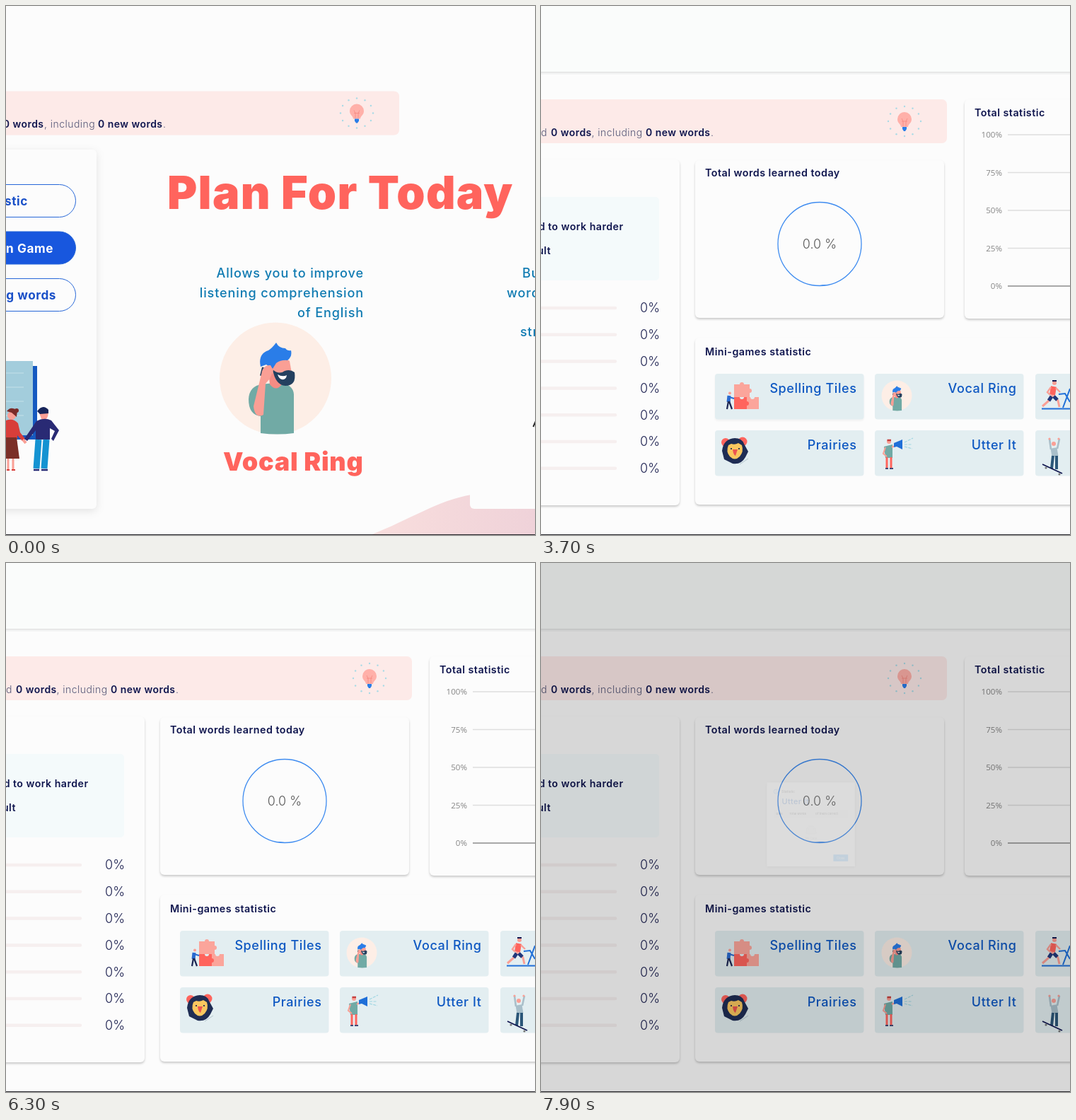
These frames come from a looping animation (748x748 px, 8000 ms). An HTML page:

```html
<!DOCTYPE html>
<html lang="en">
<head>
<meta charset="utf-8">
<title>Learning statistics</title>
<style>
html, body { margin: 0; width: 100%; height: 100%; overflow: hidden; background: #fcfcfc; }
svg { display: block; width: 100%; height: 100%; }
text { font-family: Inter, sans-serif; letter-spacing: .033em; white-space: pre; }
text.axis { font-family: "Open Sans", sans-serif; letter-spacing: 0; }
text.thin { letter-spacing: 0; }
text.heavy { letter-spacing: .02em; }
text.airy { letter-spacing: .048em; }
.card { fill: #fcfcfc; filter: drop-shadow(0 2px 1.5px rgba(0,0,0,.2)); }
.soft { fill: #fcfcfc; filter: drop-shadow(0 3px 6px rgba(0,0,0,.1)); }
.dialog { fill: #fefefe; filter: drop-shadow(0 4px 8px rgba(0,0,0,.25)); }
.lift { fill: #e3eef1; filter: drop-shadow(0 2px 1.5px rgba(0,0,0,.28)); }
</style>
</head>
<body>
<svg id="stage" viewBox="0 0 748 748"></svg>
<script>
const LOOP = 8000;
const NAVY = '#10164f', BLUE = '#0d57c2', RED = '#ff645d', SKIN = '#fa9f95', TEAL = '#71aaa5';

const rect = (x, y, w, h, fill, r = 0, extra = '') =>
  `<rect x="${x}" y="${y}" width="${w}" height="${h}" rx="${r}" fill="${fill}" ${extra}/>`;
const card = (x, y, w, h, cls = 'card', extra = '') =>
  `<rect class="${cls}" x="${x}" y="${y}" width="${w}" height="${h}" rx="6" ${extra}/>`;
const disc = (x, y, r, fill) => `<circle cx="${x}" cy="${y}" r="${r}" fill="${fill}"/>`;
const shape = (d, fill) => `<path d="${d}" fill="${fill}"/>`;
const line = (d, color, w = 1, extra = '') =>
  `<path d="${d}" fill="none" stroke="${color}" stroke-width="${w}" ${extra}/>`;
const text = (s, x, y, size, weight, fill, anchor = 'start', extra = '') =>
  `<text x="${x}" y="${y}" font-size="${size}" font-weight="${weight}" fill="${fill}" text-anchor="${anchor}" ${extra}>${s}</text>`;
const group = (id, body, extra = '') => `<g id="${id}" ${extra}>${body}</g>`;
const at = (transform, body) => `<g transform="${transform}">${body}</g>`;
const times = (n, f) => Array.from({ length: n }, (_, i) => f(i)).join('');

// ---- Illustrations ----
const bulb = times(12, i => {
  const a = i * Math.PI / 6;
  return disc(23 * Math.cos(a), 21 * Math.sin(a), 1.2, '#a9dbe6');
}) +
  shape('M-5 8C-5 4-10 3-10-3A10 10 0 0 1 10-3C10 3 5 4 5 8Z', '#ffb0a9') +
  line('M-4-4L-2 0V7M4-4L2 0V7M-4 0H4', '#f58880', .8) +
  shape('M-3 8H3V11L1 14H-1L-3 11Z', '#2a7de8');

const caller = disc(381, 526.5, 79, '#fdeee6') +
  shape('M343 556Q344 537 362 535L386 532Q406 535 407 549V604Q384 607 360 604V580Q343 578 343 556Z', TEAL) +
  shape('M371 515L373 535Q382 546 390 535V518Z', '#f58c84') +
  shape('M374 500Q388 492 401 502L404 519Q396 530 386 526L372 516Z', SKIN) +
  shape('M377 514Q386 522 394 516Q402 513 408 518Q411 537 395 537Q381 536 377 514Z', '#24405f') +
  shape('M384 521Q391 525 397 522Q396 529 390 528Q386 527 384 521Z', '#fff') +
  shape('M360 510Q356 492 371 487Q376 484 382 476Q386 484 395 484Q398 488 403 487Q405 496 398 501Q389 500 382 505L377 513L368 507Z', '#2a7de8') +
  line('M364 511L361 523', '#24405f', 4) +
  shape('M361 521Q363 507 374 508L378 515L373 527L367 534L364 578Q352 584 350 566Z', SKIN);

const puzzle = shape('M273 553V535H281A3 3 0 0 1 287 535H295V541A3 3 0 0 1 295 547V553Z', '#fba59b') +
  shape('M273 570V553H281A3 3 0 0 0 287 553H291V559A3 3 0 0 1 291 565V570Z', RED) +
  shape('M291 570V553H296A3 3 0 0 0 302 553H308V570Z', '#fba59b') + disc(291, 562, 3, RED) +
  disc(267, 547.5, 2, SKIN) + line('M266 551L265 560', '#2a6bd0', 5) +
  line('M266 553L273 555', '#2a6bd0', 2) + line('M265 559L263 570M266 559L270 570', '#1d2754', 2.2);

const lion = disc(261, 617, 6, RED) + disc(285, 616, 6.5, RED) +
  shape('M274 611Q284 611 287 619L293 630L289 638Q283 649 271 647L259 641L256 629Q258 612 274 611Z', '#1f2d54') +
  shape('M265 621L269 619Q274 621 279 618L284 621Q287 630 281 637Q274 644 267 637Q261 630 265 621Z', '#fac75f') +
  shape('M271 627H278L275 636Q272 635 271 627Z', '#ec5551') + disc(269, 626, 1.1, NAVY) + disc(280, 626, 1.1, NAVY) +
  line('M281 648L293 640', '#a8bcc4', .8);

const speaker = disc(492, 616, 3, SKIN) + line('M489.5 614H495', '#c4403e', 2.5) +
  shape('M485 623L497 620V639H487Z', TEAL) + line('M487 624L484 633L489 637M496 624L502 621', SKIN, 2) +
  line('M489 638V653M495 638V653', RED, 3) + line('M487 654H491M493 654H498', NAVY, 1.6) +
  shape('M499 618L511 613V627L503 623L499 624Z', '#1f6fd8') +
  line('M514 617L526 611M514 620H524M514 623L525 626', '#9fd6e2', 1.2, 'stroke-dasharray="4 1.5"');

const runner = disc(726, 533, 3, SKIN) + line('M723 530H729', NAVY, 2) +
  line('M725 538L723 550', RED, 8) + line('M721 539L716 546L720 550M728 540L734 546', SKIN, 2.4) +
  line('M723 550L717 559L709 566M724 551L731 558L733 567', SKIN, 3) + line('M722 552L718 558M725 552L730 557', '#22377a', 5) +
  line('M708 569.5H748M732 549L741 548L748 560M748 541L738 568', '#1f6fd8', 2);

const skater = disc(725, 619, 3, SKIN) + line('M725 625L727 637', '#a9bfca', 9) +
  line('M721 627L719 612M730 626L733 612', '#a9bfca', 2.6) + disc(719, 612, 1.6, SKIN) + disc(732, 612, 1.6, SKIN) +
  line('M724 636L722 654M729 636V655', '#2b5678', 4) + line('M709 648L737 661', NAVY, 1.8) +
  disc(714, 653, 1.6, '#777') + disc(733, 662, 1.6, '#777');

const readers = rect(-2, 509, 46, 104, '#1659c0') + rect(-2, 502, 40, 105, '#a3cddc') +
  times(4, i => line(`M0 ${519 + 20 * i}H25`, '#c5e1e9', 1)) +
  disc(8, 579, 6, SKIN) + shape('M1 573Q7 565 16 572L15 581L8 575Z', '#7b2b28') + disc(15, 572, 3, '#7b2b28') +
  shape('M0 586Q10 582 17 590L20 603L27 612L23 615L16 607V612H0Z', '#d83e3a') +
  line('M24 613L28 618', SKIN, 4) + shape('M-1 610H15L19 640H-1Z', '#7b2f27') +
  line('M3 640V655M10 640V655', SKIN, 3) + line('M1 656H5M8 656H13', '#d83e3a', 2) +
  shape('M47 576L60 575Q59 587 51 586Z', SKIN) + shape('M44 573Q52 562 60 571V576L48 577Z', '#17255a') +
  shape('M43 587Q54 581 64 586L75 600L67 615L64 612L69 601L62 597V613H42V600L30 615L26 612Z', '#292a74') +
  line('M46 613L43 654M57 613L54 654', '#1593d2', 9) + line('M39 656H47M50 656H59', '#292a74', 2.5);

// ---- First page ----
const pill = (y, label, x, full) =>
  rect(-90, y, 188.5, 46, full ? '#1857de' : '#fcfcfc', 23, 'stroke="#2767d8"') +
  text(label, x, y + 29.5, 17.2, 700, full ? '#fff' : '#1a50c8', 'end');

const blurb = (lines, x) =>
  lines.map((s, i) => text(s, x, 384 + 28 * i, 18.1, 500, '#107bb2', 'end', 'class="airy"')).join('');
const cutBlurb = (s, x, y) => text(s, x, y, 18.1, 500, '#107bb2', 'start', 'class="airy"');

const banner = (x, y) => rect(-20, y, x + 20, 62, '#fdeae8', 7) + at(`translate(${x - 60} ${y + 31})`, bulb);

const home = `<defs><linearGradient id="dune"><stop offset="0" stop-color="#f9dedd"/><stop offset="1" stop-color="#efd2d9"/></linearGradient></defs>` +
  banner(556, 120.5) +
  text('0 words', 53.5, 172, 14, 600, NAVY, 'end') + text(', including', 54, 172, 14, 300, '#555878') +
  text('0 new words', 130, 172, 14, 600, NAVY) + text('.', 222, 172, 14, 300, '#555878') +
  card(-90, 203, 218, 508, 'soft') +
  pill(252.5, 'Statistic', 31, false) + pill(319, 'Main Game', 67, true) + pill(385.5, 'Learning words', 71, false) + readers +
  text('Plan For Today', 228, 287, 64.5, 900, RED, 'start', 'class="heavy"') +
  blurb(['Allows you to improve', 'listening comprehension', 'of English'], 506) + caller +
  text('Vocal Ring', 505.5, 657, 36, 900, RED, 'end', 'class="heavy"') +
  shape('M515 748C570 727 610 699 658 691Q710 684 748 700V748Z', 'url(#dune)') +
  rect(656, 325, 120, 386, '#fcfcfc', 6) +
  cutBlurb('Build', 730, 384) + cutBlurb('words', 708, 412) + cutBlurb('structure', 727, 467) +
  line('M745.5 595L749 587', '#222', 2);

// ---- Statistics page ----
const tile = (x, y, label, art, id) => (id ? group(id, card(x, y, 210.5, 64.5, 'lift', 'style="rx:4px"')) : '') +
  rect(x, y, 210.5, 64.5, '#e3eef1', 4) + art + text(label, x + 200.5, y + 27, 18, 500, BLUE, 'end');

const level = i => {
  const y = 427 + 37.8 * i;
  return line(`M-5 ${y}H105`, '#f6efef', 4.5, 'stroke-linecap="round"') +
    text('0%', 168, y + 6.3, 18, 300, '#1c2050', 'end', 'class="thin"');
};

const tick = i => {
  const y = 182 + 53.5 * i;
  return text(`${100 - 25 * i}%`, 652, y + 4, 11.6, 400, '#858585', 'end', 'class="axis"') +
    line(`M660 ${y}H748`, i < 4 ? '#dedede' : '#8c8c8c', i < 4 ? 1.3 : 1.6);
};

const stats = rect(0, 0, 748, 93, '#fafcfb') + rect(0, 93, 748, 1.5, '#e0e1e1') + rect(0, 94.5, 748, 2, '#f1f2f2') +
  banner(574, 132) +
  text('learned', 9, 184, 14, 300, '#555878', 'end') + text('0 words', 14, 184, 14, 600, NAVY) +
  text(', including', 71.5, 184, 14, 300, '#555878') +
  text('', 148, 184, 14, 600, NAVY, 'start', 'id="fresh"') + text('.', 240, 184, 14, 300, '#555878', 'start', 'id="dot"') +
  card(-90, 217, 286, 489) + rect(-20, 270, 187, 118, '#f4fafb', 5) +
  text('You need to work harder', 116.5, 317, 14.2, 600, NAVY, 'end') + text('Difficult', 14, 351, 14.2, 600, NAVY, 'end') +
  times(7, level) +
  group('stub', rect(-20, 725.5, 146.5, 60, '#fcfcfc', 2, 'stroke="#e4e4e4"')) +
  card(218, 218, 352, 223, 'card', 'id="today"') + text('Total words learned today', 232, 241, 14.3, 600, NAVY) +
  group('ring', `<circle cx="394" cy="336.5" r="59" fill="none" stroke="#3f8cf0" stroke-width="1.3"/>` +
    `<clipPath id="bowl"><circle cx="394" cy="336.5" r="59"/></clipPath><path id="wave" clip-path="url(#bowl)" fill="#3f8cf0"/>`) +
  group('share', text('0.0 %', 394, 342.5, 18, 300, '#585858', 'middle', 'class="thin"')) +
  card(218, 469, 570, 236) + text('Mini-games statistic', 232, 494, 14.3, 600, NAVY) +
  tile(246, 520, 'Spelling Tiles', puzzle, 'hover0') +
  tile(472, 520, 'Vocal Ring', at('translate(503 551) scale(.272) translate(-381 -526.5)', caller)) +
  tile(699, 520, '', runner) +
  tile(246, 600, 'Prairies', lion) + tile(472, 600, 'Utter It', speaker, 'hover1') + tile(699, 600, '', skater) +
  group('panel', card(599, 132, 220, 310) + text('Total statistic', 613, 156, 14.3, 600, NAVY) + group('axes', times(5, tick)));

// ---- Dialog ----
const dialog = card(176, 165, 412, 393.5, 'dialog', 'style="rx:2px"') +
  `<circle cx="218.5" cy="208" r="10.3" fill="none" stroke="#1890ff" stroke-width="1.8"/>` +
  line('M218.5 206.5V213.5', '#1890ff', 1.8) + disc(218.5, 203, 1.2, '#1890ff') +
  text('Statistic', 245, 213, 15.4, 400, '#2b2b2b') +
  text('', 246, 267, 36, 500, BLUE, 'start', 'id="game"') +
  rect(211, 293, 344.5, 36.5, '#fafafa') + line('M211 329.5H555.5M211 478.5H555.5', '#f0f0f0') +
  text('Date', 219, 316, 13.4, 500, '#3c3c3c') + text('Total words', 281, 316, 13.4, 500, '#3c3c3c') +
  text('Of them correct', 402, 316, 13.4, 500, '#3c3c3c') +
  at('translate(353 370.5) scale(.94)', `<ellipse cx="32" cy="33" rx="32" ry="7" fill="#f5f5f5"/>` +
    `<path d="M55 13L45 1.3Q44 0 43 0H21Q20 0 19 1.3L9 13V31Q9 35 12 35H52Q55 35 55 31ZM9 13H20Q22.4 13 22.4 16Q22.4 19 25 19H39Q41.6 19 41.6 16Q41.6 13 44 13H55" fill="#fafafa" stroke="#d9d9d9"/>`) +
  text('No Data', 383.5, 433, 13.7, 400, '#c8c8c8', 'middle') +
  rect(487, 503, 69, 31.5, '#40a9ff', 2, 'id="button"') + text('Close', 521.5, 523.8, 13.7, 400, '#fff', 'middle');

document.getElementById('stage').innerHTML = rect(0, 0, 748, 748, '#fcfcfc') +
  group('stats', stats) + group('home', home) + rect(0, 0, 748, 748, '#000', 0, 'id="mask"') +
  group('dialog', dialog) + rect(0, 747, 748, 1, '#26262b');

// ---- Motion ----
const $ = id => document.getElementById(id);
const ramp = (t, from, span) => Math.min(1, Math.max(0, (t - from) / span));
const alpha = (id, v) => {
  $(id).setAttribute('opacity', v);
  $(id).style.display = v > 0 ? '' : 'none';
};

function bezier(x1, y1, x2, y2) {
  const curve = (u, a, b) => 3 * (1 - u) ** 2 * u * a + 3 * (1 - u) * u * u * b + u ** 3;
  return x => {
    if (x <= 0 || x >= 1) return Math.min(1, Math.max(0, x));
    let lo = 0, hi = 1;
    for (let i = 0; i < 24; i++) {
      const mid = (lo + hi) / 2;
      if (curve(mid, x1, x2) < x) lo = mid; else hi = mid;
    }
    return curve(lo, y1, y2);
  };
}
const easeOut = bezier(.08, .82, .17, 1), easeInOut = bezier(.78, .14, .15, .86);

const visits = [
  { name: 'Spelling Tiles', hover: 3650, open: 4570, close: 5801 },
  { name: 'Utter It', hover: 6560, open: 6830, close: 7768 }
];

function drawWave(t) {
  let d = 'M380 400';
  for (let x = 380; x <= 408; x += 2) d += `L${x} ${(394.6 + .6 * Math.sin(x / 4 - t / 180)).toFixed(2)}`;
  $('wave').setAttribute('d', d + 'L408 400Z');
}

function drawDialog(t) {
  const v = visits[t < 6500 ? 0 : 1];
  const shown = easeOut(ramp(t, v.open, 200)) * (1 - easeInOut(ramp(t, v.close, 200)));
  const s = .2 + .8 * shown;
  alpha('dialog', shown);
  $('dialog').setAttribute('transform', `translate(381.5 373) scale(${s}) translate(-381.5 -373)`);
  $('game').textContent = v.name;
  const f = ramp(t, v.open, 200);
  $('button').setAttribute('fill', `rgb(${24 + 40 * f},${144 + 25 * f},255)`);
  alpha('mask', .45 * ramp(t, v.open - 30, 200) * (1 - ramp(t, v.close, 200)));
}

function update(t) {
  alpha('home', 1 - ramp(t, 650, 400));
  alpha('stats', ramp(t, 950, 300));
  const loaded = t >= 1400, counted = t >= 1600;
  $('today').setAttribute('height', loaded ? 223 : 64);
  alpha('stub', loaded ? 0 : 1);
  alpha('panel', loaded ? 1 : 0);
  alpha('ring', t >= 1500 ? 1 : 0);
  alpha('share', counted ? 1 : 0);
  alpha('axes', ramp(t, 1850, 500));
  $('fresh').textContent = counted ? '0 new words' : 'new words';
  $('dot').setAttribute('x', counted ? 240 : 226.5);
  drawWave(t);
  visits.forEach((v, i) => alpha('hover' + i, ramp(t, v.hover, 300) * (1 - ramp(t, v.open, 100))));
  drawDialog(t);
}

const start = performance.now();
function tickFrame() {
  update((performance.now() - start) % LOOP);
  requestAnimationFrame(tickFrame);
}
tickFrame();
</script>
</body>
</html>
```
